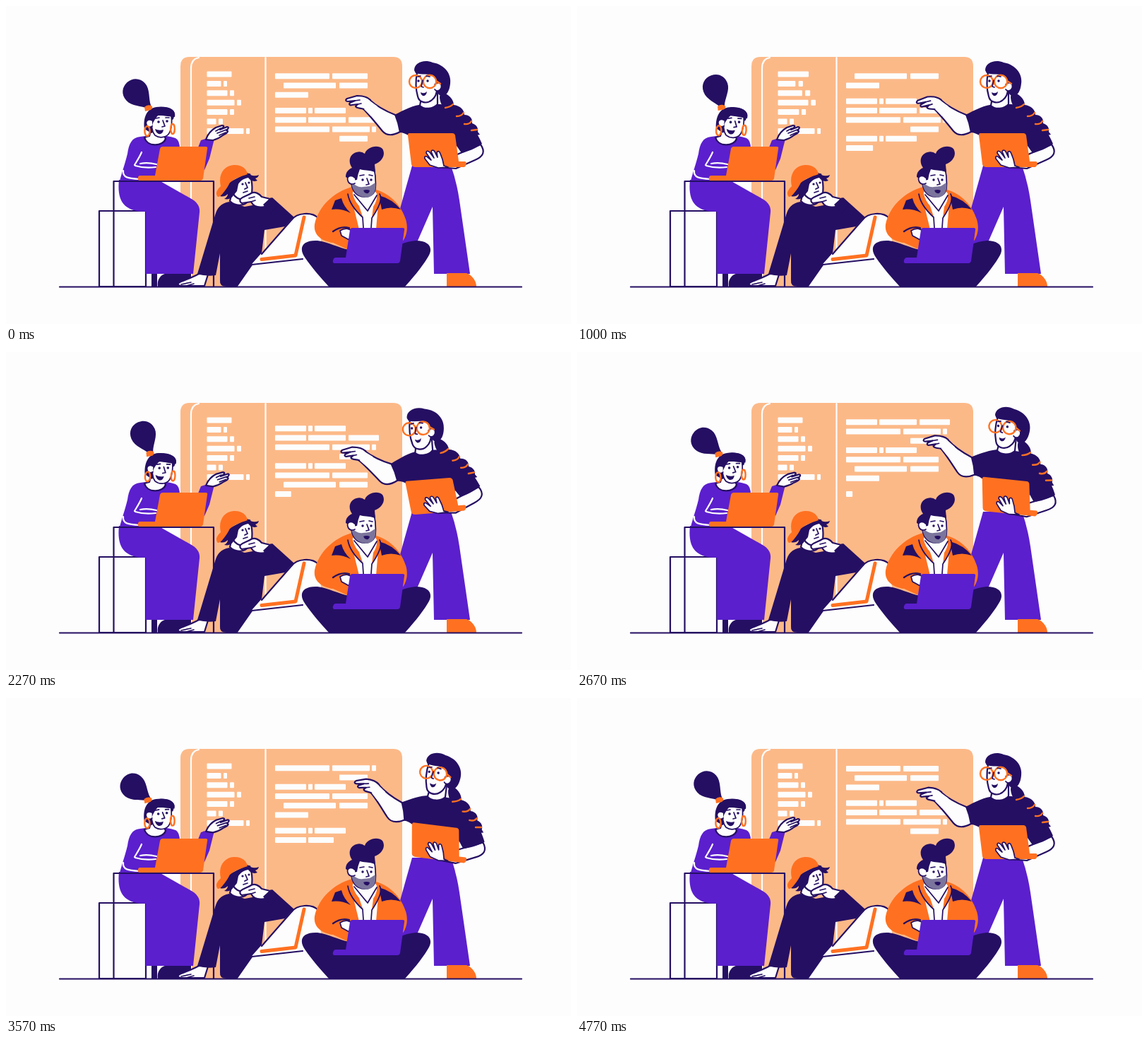
Recreate the animation shown at these times as an HTML page. Size 800 by 450 pixels, loop 4.81 s.

```html
<!DOCTYPE html>
<html lang="en">
<head>
<meta charset="utf-8">
<title>Team at work</title>
<style>
html, body { margin: 0; width: 100%; height: 100%; overflow: hidden; background: #fdfdfd; }
svg { display: block; width: 100%; height: 100%; }
path, line { stroke-linecap: round; stroke-linejoin: round; }
.n { fill: #250f63; }
.p { fill: #5b1fcd; }
.o { fill: #ff7121; }
.w { fill: #fdfdfd; }
.a { fill: #fcb988; }
.g { fill: #7b749c; }
.l { fill: none; stroke: #250f63; stroke-width: 2.2; }
.wl { fill: #fdfdfd; stroke: #250f63; stroke-width: 2.2; }
.ol { fill: none; stroke: #ff7121; stroke-width: 2.4; }
.wh { fill: none; stroke: #fdfdfd; stroke-width: 2.2; }
.thin { stroke-width: 1.7; }
</style>
</head>
<body>
<svg viewBox="0 0 800 450">
  <clipPath id="pane"><rect x="370" y="91.5" width="190" height="130"/></clipPath>

  <!-- window -->
  <path class="a" d="M247 397V85Q247 72 260 72H548Q561 72 561 85V397Z"/>
  <path class="wh" d="M262 397V88Q262 75 273 73M367.5 73V397"/>
  <g id="menu" class="w"></g>
  <g id="code" class="w" clip-path="url(#pane)"></g>

  <!-- woman standing -->
  <path class="p" d="M575 226L557 290L545 380H562L604 284L606 379H657L642 275Q638 248 630 226Z"/>
  <path class="o" d="M624 397V378H652C660 381 666 389 666 397Z"/>
  <g id="stand">
    <path class="wl" d="M560 156L551 154C538 149 524 141 514 132L505 145C513 152 523 165 533 177C539 184 547 184 558 178Z"/>
    <g id="point">
      <path class="wl" d="M516 133C511 128 504 127 497 127L483 131C480 133 481 135 484 135L494 134L487 137C485 139 487 141 490 140L498 139L495 142C496 145 500 144 507 146"/>
      <path class="l thin" d="M494 134L501 133M498 139L503 138"/>
    </g>
    <path class="w" d="M515 134L526 142L517 156L507 146Z"/>
    <path class="wl" d="M646 207L672 196C679 206 676 213 664 218L637 230L612 228L625 216Z"/>
    <path class="n" d="M550 154C564 147 577 140 591 139H611C632 139 644 149 654 162C663 174 670 185 674 195C664 202 654 206 645 208L638 198V226H575L571 184C567 181 562 179 557 179Q555 166 550 154Z"/>
    <path class="wl" d="M588 130L586 141C592 147 605 146 611 139L611 122Z"/>
    <path class="n" d="M617 122C626 124 634 132 634 140C643 141 649 147 649 154C657 154 661 160 660 166C667 168 669 174 668 178L671 182L661 184C655 182 651 178 650 173C643 172 639 167 638 161C630 160 625 154 624 147C618 144 614 136 614 128Z"/>
    <path class="ol" d="M622 144Q629 143 633 139M638 156Q645 156 648 151M649 167Q656 168 659 163M659 176L667 175"/>
    <path class="wl" d="M582 94C580 105 580 118 583 128C585 137 596 139 603 133C608 129 610 124 610 118L611 94Z"/>
    <path class="n" d="M578 91C578 80 592 75 604 80C622 83 631 97 629 110C628 120 624 127 617 128C612 126 609 121 611 114C613 108 610 104 606 99C599 95 588 98 580 95Z"/>
    <path class="wl thin" d="M607 111C612 106 618 110 616 116C614 121 609 121 607 118"/>
    <circle class="ol" cx="580" cy="107" r="9"/>
    <circle class="ol" cx="600" cy="107" r="9.2"/>
    <path class="ol" d="M609 106L615 110"/>
    <path class="l thin" d="M590 105L588 114L591 115M583 100L587 99M595 99L600 100"/>
    <circle class="n" cx="584" cy="106" r="1.7"/>
    <circle class="n" cx="597" cy="106" r="1.7"/>
    <path class="n" d="M587 122Q592 125 596 121Q595 128 590 127Q587 125 587 122Z"/>
    <path class="o" d="M571 180H632Q635 180 636 183L641 220H650Q653 221 651 226L649 228H580Q575 228 574 224L569 183Q569 180 571 180Z"/>
    <path class="wl thin" d="M612 229L600 225L593 216C592 212 595 212 597 214L602 218L595 208C595 204 598 205 600 207L606 215L602 206C603 203 606 204 607 206L611 214L610 207C612 204 614 206 615 209L618 217L620 226L626 228Z"/>
  </g>

  <!-- woman at the desk -->
  <path class="wl" d="M132 290H198V397H132Z"/>
  <path class="p" d="M276 190Q285 186 295 188L288 216L281 232L260 230Z"/>
  <g id="hand">
    <path class="wl" d="M283 189C285 183 290 176 297 172L306 169C309 169 309 171 306 173L303 175L313 171C316 171 315 174 312 176L314 177C314 180 310 181 307 183C302 187 297 189 293 190Z"/>
    <path class="l thin" d="M299 180L312 175M297 177L304 173M302 183L311 179"/>
  </g>
  <path class="n" d="M206 378H214V397H206ZM215 397C213 386 221 378 230 378H262V392L250 397Z"/>
  <path class="p" d="M160 246C157 275 166 291 198 291V379H265L274 292C275 283 270 277 261 272L215 246Z"/>
  <path class="p" d="M160 252C163 238 169 222 172 209C174 195 178 186 190 185C205 183 226 182 240 187Q246 190 246 202L222 248Z"/>
  <path class="wl" d="M205 176L203 184L196 186C200 200 222 199 226 188L222 178Z"/>
  <path class="wh" d="M192 207C189 214 185 220 182 225M190 223Q201 221 213 224M183 226Q196 230 212 228M166 233C165 243 173 244 189 245"/>
  <path class="o" d="M222 199H283Q286 199 285 202L279 244Q278 247 275 247H190Q186 247 187 243Q187 240 190 240H211L218 202Q219 199 222 199Z"/>
  <path class="l" d="M152.5 397V248H294V397"/>
  <g id="nod">
    <path id="pony" class="n" d="M-3 0C-7 -9 -18 -17 -18 -29C-18 -40 -10 -47 0 -47C11 -47 18 -39 18 -29C18 -18 7 -10 3 0Z"/>
    <path class="n" d="M196 174C194 158 199 145 213 143C226 141 239 145 239 153L237 160L206 180Z"/>
    <path class="wl thin" d="M207 158C206 170 206 177 211 183C218 188 229 186 232 178C235 171 235 162 234 155L215 154Z"/>
    <path class="n" d="M200 160C200 148 210 143 222 143C234 143 241 149 239 157L229 156L216 154C212 158 209 163 207 168Z"/>
    <path class="wl thin" d="M207 162C201 159 197 163 199 168C200 172 204 172 207 170"/>
    <ellipse class="ol" cx="200" cy="177" rx="3.6" ry="7"/>
    <ellipse class="ol" cx="236" cy="174" rx="2.8" ry="7"/>
    <path class="o" d="M196 143Q200 139 206 141Q209 144 205 147L197 149Z"/>
    <circle class="n" cx="216" cy="164" r="1.8"/>
    <circle class="n" cx="228" cy="163" r="1.8"/>
    <path class="l thin" d="M222 162L225 170L221 171M212 159L217 158M226 158L231 158"/>
    <path class="n" d="M211 174Q217 177 223 175Q222 182 216 181Q212 179 211 174Z"/>
  </g>

  <!-- sitting with cap -->
  <path class="wl" d="M273 379C266 383 256 387 248 390C243 392 242 395 247 396H281L286 380Z"/>
  <path class="l thin" d="M248 394L262 391M255 396L266 393"/>
  <path class="n" d="M316 277C304 279 299 286 296 296L271 379Q284 383 297 381L303 350V388Q302 397 312 397H327L350 364L362 350L366 317L395 312L408 299L377 271L360 280L338 284Z"/>
  <path class="w" d="M326 397L349 364L404 302C412 292 433 290 442 299L448 350L460 397Z"/>
  <path class="l" d="M362 351L404 303C412 292 433 291 442 300M327 396L348 366L420 358"/>
  <path class="ol" d="M362 358.5L410 353L422 299" style="stroke-width:5"/>
  <path class="wl" d="M320 264L317 276C325 284 337 283 342 277L340 266Z"/>
  <path class="wl" d="M318 250C318 259 321 268 328 272C336 276 345 273 348 266C349 256 348 245 345 238H322Z"/>
  <path class="n" d="M311 252L342 236C347 241 353 241 358 239Q357 243 353 244L356 247Q348 250 343 243C337 244 332 247 329 252L327 262L322 268Q318 275 309 273Q314 270 314 266Q309 271 303 269Q309 264 311 252Z"/>
  <path class="o" d="M299 269C296 264 300 259 304 255C300 238 309 226 322 225C333 224 341 230 342 238C333 241 324 244 317 250C313 258 308 265 303 269Q300 271 299 269Z"/>
  <circle class="n" cx="335" cy="252" r="1.6"/>
  <circle class="n" cx="344" cy="250" r="1.6"/>
  <path class="l thin" d="M339 250L342 257L338 259M336 264L342 262"/>
  <path class="wl" d="M332 273C337 269 343 268 347 265C353 262 359 266 362 270L374 273L366 284C356 286 350 283 347 277L334 279Q330 277 332 273Z"/>
  <path class="l thin" d="M344 272L352 270M347 277L353 275"/>
  <path class="n" d="M364 281L375 271L385 280L375 294Z"/>

  <!-- man with laptop -->
  <path class="n" d="M424 357C413 342 420 331 441 332C457 334 470 342 486 345H540C553 340 565 333 580 332C600 332 606 343 597 356C588 371 574 387 565 397H457C446 385 433 370 424 357Z"/>
  <path class="o" d="M490 256C464 263 442 284 437 309C435 324 447 333 463 335L483 344H545L560 335C569 325 569 311 566 302C560 283 545 266 524 260Z"/>
  <path class="n" d="M466 275L475 272Q478 284 488 293Q474 286 461 288ZM528 268Q547 273 559 288Q545 283 532 288Z"/>
  <path class="w" d="M494 260L488 267L500 316H524L528 268L521 261Z"/>
  <path class="o" d="M490 257C480 262 483 273 488 281Q496 291 505 298L500 283Q493 275 491 266ZM524 261Q534 270 527 284L518 300L520 284Q526 275 525 267Z"/>
  <path class="l thin" d="M484 266C486 279 494 289 505 299L506 314M493 267L512 290L525 268M529 266Q535 275 518 300L517 314"/>
  <path class="l" d="M463 319Q474 311 486 314"/>
  <path class="wl thin" d="M473 318C480 313 487 315 490 319L486 331L475 325Z"/>
  <path class="wl thin" d="M488 238C488 252 490 263 499 268C509 273 521 269 523 259C524 248 523 238 521 229H497Z"/>
  <path class="g" d="M489 247L494 253Q500 257 505 256L515 255L523 250C525 263 519 271 510 271C498 270 489 262 489 247Z"/>
  <path class="n" d="M481 242C481 235 485 231 490 229C484 221 486 210 496 207Q503 205 508 209C510 200 526 195 533 202C538 210 533 220 522 224L523 236C518 232 508 233 501 231Q498 238 497 246L490 247Z"/>
  <path class="wl thin" d="M494 243C488 238 482 241 484 247C485 252 490 253 494 251"/>
  <circle class="n" cx="505" cy="246" r="1.7"/>
  <circle class="n" cx="517" cy="246" r="1.7"/>
  <path class="l thin" d="M511 244L514 252L510 253M501 240L507 239M514 239L519 240"/>
  <path class="n" d="M506 261Q511 259 515 261Q514 266 510 265Q507 264 506 261Z"/>
  <path class="p" d="M490 314H562Q565 314 564 317L558 361Q557 364 554 364H466Q462 364 463 360Q464 356 467 356H481L487 317Q488 314 490 314Z"/>

  <line x1="76" y1="397.5" x2="730" y2="397.5" class="l"/>
</svg>
<script>
const LOOP = 4810, PERIOD = 115, BASE = 201;
const $ = id => document.getElementById(id);

// code rows: offset down the page, typing start, typing end, bars as [x, width]
const rows = [
  { y: 0,     from: 30,   to: 740,  bars: [[381, 44], [428, 6], [437, 44]] },
  { y: 13.2,  from: 870,  to: 1320, bars: [[381, 77], [462, 50]] },
  { y: 26.5,  from: 1480, to: 1950, bars: [[393, 74], [472, 40]] },
  { y: 39.8,  from: 2150, to: 2400, bars: [[381, 47]] },
  { y: 62,    from: 2620, to: 3180, bars: [[381, 44], [428, 6], [437, 44]] },
  { y: 75.2,  from: 3300, to: 3780, bars: [[381, 44], [428, 53], [485, 43]] },
  { y: 88.5,  from: 3910, to: 4380, bars: [[381, 77], [462, 53], [518, 6]] },
  { y: 101.8, from: 4460, to: 4610, bars: [[472, 40]] }
];
const scroll = rows.flatMap(r => [[r.from, r.y], [r.to, r.y]]).concat([[4800, PERIOD]]);

const sway = [[1720, 0], [2200, -4.4], [2300, -4.4], [2850, 9], [3400, 9], [3960, 0]];
const nod = [[200, 0], [850, 4], [2100, 4], [2800, -1.5], [3300, -1.5], [3900, 0]];
const tail = [[200, -42], [900, -24], [2150, -24], [2850, -55], [3300, -55], [3950, -42]];
const palm = [[1750, 0], [2250, 3], [2850, 5], [3300, 5], [3900, 0]];

// smooth value between keys [time, value]
function key(keys, t) {
  const i = keys.findIndex(k => k[0] > t);
  if (i < 0) return keys[keys.length - 1][1];
  if (!i) return keys[0][1];
  const [a, u] = keys[i - 1], [b, v] = keys[i];
  return u + (v - u) * (1 - Math.cos(Math.PI * (t - a) / (b - a))) / 2;
}

function add(parent, tag, attrs) {
  const el = document.createElementNS("http://www.w3.org/2000/svg", tag);
  for (const k in attrs) el.setAttribute(k, attrs[k]);
  return parent.appendChild(el);
}
const bar = (parent, x, y, width) => add(parent, "rect", { x, y, width, height: 8, rx: 1 });

const menu = [[35], [20, 5], [29, 6], [39, 6], [29, 6], [13, 6], [52, 5]].map((widths, i) => {
  const g = add($("menu"), "g", {});
  let x = 0;
  for (const w of widths) {
    bar(g, x, 92.5 + i * 13.4, w);
    x += w + 3.5;
  }
  return g;
});

const lines = [-1, 0].flatMap(turn => rows.map(row => {
  const g = add($("code"), "g", {});
  return { row, turn, g, rects: row.bars.map(b => bar(g, b[0], -4, b[1])) };
}));

const rotate = (id, angle, x, y) => $(id).setAttribute("transform", `rotate(${angle} ${x} ${y})`);

function draw(t) {
  const top = key(scroll, t);
  for (const { row, turn, g, rects } of lines) {
    g.setAttribute("transform", `translate(0 ${BASE + row.y + turn * PERIOD - top})`);
    const first = row.bars[0][0], [x, w] = row.bars[row.bars.length - 1];
    const done = turn < 0 ? 1 : Math.min(1, Math.max(0, (t - row.from) / (row.to - row.from)));
    const reach = first + done * (x + w - first);
    rects.forEach((r, i) => {
      const [bx, bw] = row.bars[i];
      r.setAttribute("width", Math.min(bw, Math.max(0, reach - bx)));
    });
  }
  // a stretch runs down the menu once per loop
  menu.forEach((g, i) => {
    const d = (t - 950 - i * 110) / 500;
    const grow = Math.abs(d) < 1 ? .25 * Math.cos(d * Math.PI / 2) ** 2 : 0;
    g.setAttribute("transform", `translate(284.5 0) scale(${1 + grow} 1)`);
  });
  rotate("stand", key(sway, t), 605, 228);
  rotate("point", -11 * Math.sin(4 * Math.PI * t / LOOP), 512, 138);
  rotate("nod", key(nod, t), 212, 186);
  rotate("hand", key(palm, t), 286, 190);
  $("pony").setAttribute("transform", `translate(203 143) rotate(${key(tail, t)})`);
}

const start = performance.now();
function frame() {
  draw((performance.now() - start) % LOOP);
  requestAnimationFrame(frame);
}
frame();
</script>
</body>
</html>
```
